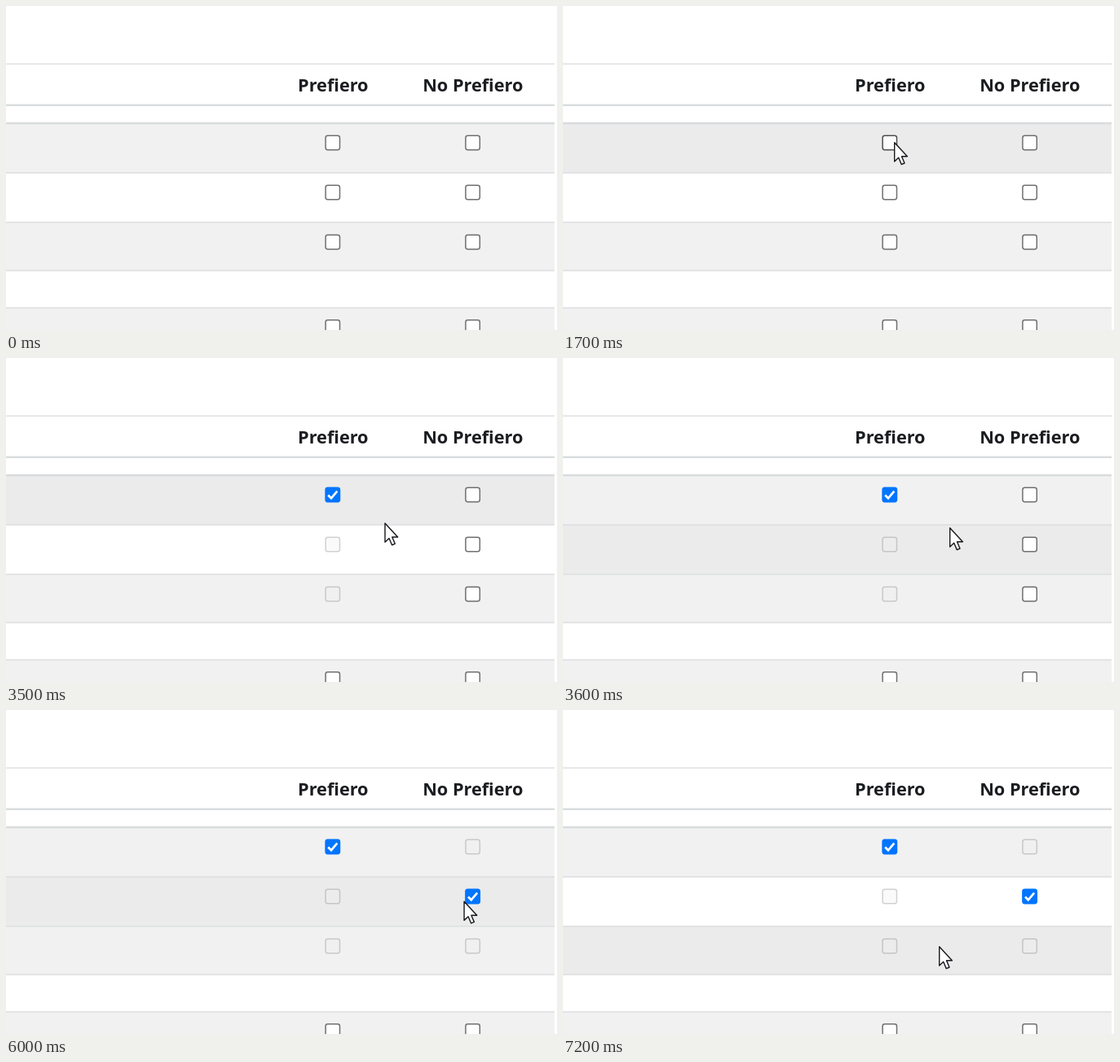
An HTML page that plays this animation: 676x398 px, repeating every 7300 ms.

```html
<!DOCTYPE html>
<html lang="es">
<head>
<meta charset="utf-8">
<title>Preferencias</title>
<style>
  html, body { margin: 0; width: 100%; height: 100%; overflow: hidden; background: #fff; }
  svg { display: block; width: 676px; height: 398px; }
  text { font: bold 21.7px "Open Sans", "Noto Sans", sans-serif; font-variant-ligatures: none; text-anchor: middle; fill: #1b1d21; }
</style>
</head>
<body>
<svg id="stage" viewBox="0 0 676 398">
  <text x="401.3" y="105">Prefiero</text>
  <text x="572.8" y="105">No Prefiero</text>
</svg>
<script>
const LOOP = 7300, STEP = 100, WIDTH = 673;
const COLUMNS = [400.8, 572.6];
const ROWS = [
  { top: 144, bottom: 205, y: 168, fill: '#f1f1f1' },
  { top: 205, bottom: 266, y: 229, fill: '#fff' },
  { top: 266, bottom: 325, y: 290, fill: '#f1f1f1' },
  { top: 371, bottom: 398, y: 394.5, fill: '#f1f1f1' }
];
// One tick per column: the ticked row disables the other rows of its column
// and the other column of its row.
const CLICKS = [{ time: 2300, row: 0, column: 0 }, { time: 4900, row: 1, column: 1 }];
// time, x, y of the pointer tip
const PATH = [
  [100, 617, 146], [700, 400, 164], [900, 430, 157], [1600, 404, 165],
  [1700, 406, 167], [2900, 406, 167], [3600, 474, 208], [3700, 488, 212],
  [4500, 568, 230], [5900, 568, 230], [6700, 515, 265], [7200, 461, 290]
];

const stage = document.getElementById('stage');

function set(node, attributes) {
  for (const name in attributes) node.setAttribute(name, attributes[name]);
  return node;
}
function add(tag, attributes) {
  const node = document.createElementNS('http://www.w3.org/2000/svg', tag);
  return stage.appendChild(set(node, attributes));
}
function line(y, height, fill) {
  add('rect', { x: 0, y: y - height / 2, width: WIDTH, height, fill });
}

for (const row of ROWS)
  row.node = add('rect', { x: 0, y: row.top, width: WIDTH, height: row.bottom - row.top });
line(71.2, 1.6, '#e0e2e3');
line(121.8, 2.4, '#d9dcde');
line(144, 2.6, '#d9dcde');
for (const y of [205, 265.7, 325, 370.8]) line(y, 1.5, '#dcdee0');

const boxes = ROWS.flatMap((row, r) => COLUMNS.map((x, column) => ({
  x, y: row.y, row: r, column,
  node: add('rect', { x: x - 8.7, y: row.y - 8.7, width: 17.4, height: 17.4, rx: 2.6, 'stroke-width': 1.5 }),
  mark: add('path', {
    d: `M${x - 5.6} ${row.y + .5}l3.8 3.8l7.3 -8.6`,
    fill: 'none', stroke: '#fff', 'stroke-width': 2.7
  })
})));
const pointer = add('path', {
  d: 'M.7 .8V24L5.7 19.3L9.3 27.6L13 26L9.5 17.8H16.4Z',
  fill: '#fff', stroke: '#17181c', 'stroke-width': 1.4, 'stroke-linejoin': 'round'
});

function pointerAt(time) {
  if (time < PATH[0][0]) return null;
  const next = PATH.findIndex(point => point[0] >= time);
  if (next === 0) return { x: PATH[0][1], y: PATH[0][2] };
  const [t0, x0, y0] = PATH[next - 1], [t1, x1, y1] = PATH[next];
  const k = (time - t0) / (t1 - t0);
  return { x: x0 + (x1 - x0) * k, y: y0 + (y1 - y0) * k };
}

function paintBox(box, tip, clicks) {
  const checked = clicks.some(c => c.row === box.row && c.column === box.column);
  const disabled = !checked && box.row < 3 && clicks.some(c =>
    c.column === box.column || (c.row === box.row && c.column === 0 && box.column === 0) ||
    (c.row === box.row && c.column === 1));
  const hover = tip && Math.abs(tip.x - box.x) < 9.5 && Math.abs(tip.y - box.y) < 9.5;
  let fill = '#fff', stroke = hover ? '#4f4f4f' : '#707070';
  if (checked) fill = stroke = hover ? '#0059c8' : '#0075ff';
  else if (disabled) { fill = 'rgba(239,239,239,.3)'; stroke = 'rgba(118,118,118,.32)'; }
  set(box.node, { fill, stroke });
  set(box.mark, { visibility: checked ? 'visible' : 'hidden' });
}

function draw(now) {
  const time = Math.floor(now % LOOP / STEP) * STEP;
  const tip = pointerAt(time);
  const clicks = CLICKS.filter(click => time >= click.time);
  for (const row of ROWS) {
    const hover = tip && tip.y >= row.top && tip.y < row.bottom;
    set(row.node, { fill: hover ? '#ebebeb' : row.fill });
  }
  for (const box of boxes) paintBox(box, tip, clicks);
  set(pointer, { visibility: tip ? 'visible' : 'hidden' });
  if (tip) set(pointer, { transform: `translate(${tip.x} ${tip.y})` });
}

const start = performance.now();
function tick() {
  draw(performance.now() - start);
  requestAnimationFrame(tick);
}
tick();
</script>
</body>
</html>
```
